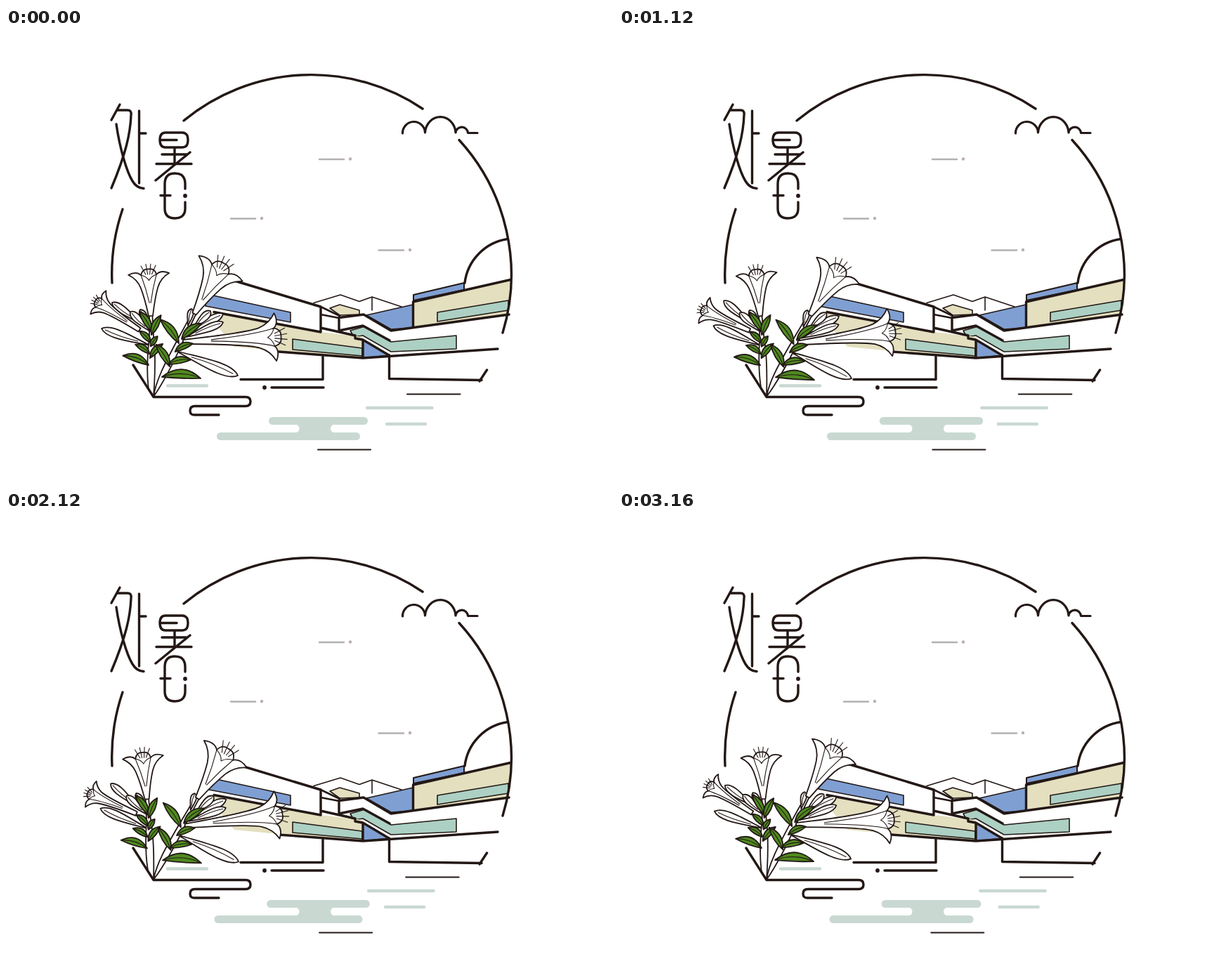
An HTML page that plays this animation: 864x648 px, repeating every 3200 ms.

```html
<!DOCTYPE html>
<html lang="zh">
<head>
<meta charset="utf-8">
<title>处暑</title>
<style>
  html, body { margin: 0; width: 100%; height: 100%; overflow: hidden; background: #fff; }
  svg { display: block; width: 864px; height: 648px; --sway: 0; --wave: 0; }
  path { fill: none; stroke: #231815; stroke-linecap: round; stroke-linejoin: round; }
  .ink path, path.ink { stroke-width: 3.4; }
  .mid { stroke-width: 2.6; }
  .thin { stroke-width: 1.6; }
  .fine { stroke-width: 2; }
  .grey { stroke: #b3b1b1; stroke-width: 2.4; }
  .pool { stroke: #c9d9d2; stroke-width: 4.4; }
  .dot { fill: #bdaeb0; }
  .blue { fill: #7f9fd3; }
  .sand { fill: #e3dfbf; }
  .teal { fill: #acd0c3; }
  .white { fill: #fff; }
  .bare { stroke: none; }

  .plant path { fill: #fff; stroke-width: 1.8; }
  .plant .crease { fill: none; stroke-width: 1.1; }
  .plant .leaf { fill: #4f8a1f; }
  .plant { transform-origin: 210px 525px; }
  #stemL { transform: rotate(calc(-4.1deg * var(--sway))); }
  #stemR { transform: rotate(calc(3.3deg * var(--sway))); }

  .bar { fill: #c9d9d2; height: 11px; rx: 5.5px; }
  #upper { x: calc(374px - 4px * var(--wave)); width: calc(141px + 8px * var(--wave)); }
  #lower { x: calc(300px - 5px * var(--wave)); width: calc(204px + 10px * var(--wave)); }
  #east { transform: translateX(calc(3px * var(--wave))); }
  #west { transform: translateX(calc(-2.7px * var(--wave))); }
</style>
</head>
<body>
<svg id="scene" viewBox="0 0 864 648">
  <!-- cloud and sun -->
  <path class="mid" style="stroke-width:3.2" d="M564.5 150A16 16 0 0 1 596.5 149A21.8 24 0 0 1 640 149A8.8 9 0 0 1 657.500 149.500H671"/>
  <path class="ink" d="M653 363A72 72 0 0 1 714 300.500"/>

  <!-- drawn title -->
  <g class="ink">
    <path d="M162 109L150 131M158 117H173Q179 117 178 124C177 150 171 178 150 228M157 137C162 172 172 205 180 218Q186 228 196 228.500M189.500 118V221M190 150H199"/>
    <path d="M227 149H251Q259 149 259 159.500T251 170H227Q219 170 219 159.500T227 149M220 159.500H243M240 170V193M222 180H257M214 193.500H264M262 177L213 217"/>
    <path d="M255 229V222Q255 207 240.500 207T226 222V257Q226 271 240.500 271T255 257V248M220 238.500H234"/>
    <circle cx="255" cy="239" r="2.900" fill="#231815"/>
  </g>

  <path class="grey" d="M446 187H481M320 271.500H355M530.500 316.500H566"/>
  <g class="dot">
    <circle cx="490" cy="186.500" r="2.200"/><circle cx="364" cy="271" r="2.200"/><circle cx="575" cy="316" r="2.200"/>
  </g>

  <!-- roofs behind -->
  <path class="thin" d="M438 391.500L476 380L503 389.500L521 383L563 397M521 383V402"/>
  <path class="thin sand" d="M461 399L475 394L503 402V408L475 409Z"/>
  <path class="mid" d="M448 397L475 410M448 408L474 413"/>

  <!-- right wing -->
  <path class="thin blue" d="M513 409L579 394V427L548 429Z"/>
  <path class="fine blue" d="M580 380L652 363V373L580 388Z"/>
  <path class="bare sand" d="M580 390L718 359L715 408L580 428Z"/>
  <path class="thin teal" d="M614 405L715 388V402L614 418Z"/>
  <path class="ink" d="M718 358.500L579.500 390V428"/>

  <!-- stair -->
  <path class="bare white" d="M474 432V412L509 408L548 431L716 410L700 457L545 466L508 442Z"/>
  <path class="thin teal" d="M490 431L511 425L548 447L641 438V457L548 461L508 438L495 440Z"/>
  <path class="ink" d="M474 431V412.500L509 408L548 431L716 408M474 431L508 424L546 445"/>
  <path class="thin blue" d="M508 444V470L546 466Z"/>

  <!-- left wing -->
  <path class="bare sand" d="M284 404L448 433L508 440V470L388 460L325 454Z"/>
  <path class="thin teal" d="M408 443L507 456V467L408 458Z"/>
  <path class="bare white" d="M280 375L334 362L448 397V433L295 404Z"/>
  <path class="thin blue" d="M286 379L405 405V419L284 396Z"/>
  <path class="ink" d="M322 359L448 397V433L296 404.500M448 427L497 438V442L508 444V470M388 461L508 470L700 457M508 444L545 466"/>

  <!-- ring, piers and quay -->
  <path class="ink" d="M253 132A284.500 284.500 0 0 1 593 115M645 159.500A284.500 284.500 0 0 1 707 434M166 258A284.500 284.500 0 0 0 151 363"/>
  <path class="ink" d="M334 500.500H451V468M545.500 466V499.500L677 501.500M674 503L684.500 487M378 512H452"/>
  <circle cx="368" cy="512" r="2.900" fill="#231815"/>
  <path class="pool" d="M230 509.500H286"/>

  <!-- water -->
  <path class="bare" style="fill:#c9d9d2" d="M411.500 564.500a5.800 5.800 0 0 1 0 12H468a5.800 5.800 0 0 1 0-12Z"/>
  <rect id="upper" class="bar" y="554"/>
  <rect id="lower" class="bar" y="576"/>
  <g id="east"><path class="pool" d="M514 541H606.500"/><path class="fine" d="M444 600.500H519"/></g>
  <g id="west"><path class="pool" d="M542 564H597"/><path class="fine" d="M571 521.500H646.500"/></g>

  <g id="stemL" class="plant"></g>
  <g id="stemR" class="plant"></g>
  <path class="ink" d="M181 480L210 525.500H341Q348 525.500 348 532T341 538.500H269Q262 538.500 262 545T269 551H303"/>
</svg>
<script>
const $ = id => document.getElementById(id);
const mix = (a, b, t) => a + (b - a) * t;
const path = (d, kind = '') => `<path class="${kind}" d="${d}"/>`;

// Puts a part drawn along +x at its base; it turns about that base as it sways
const place = (x, y, heading, swing, body) =>
  `<g style="transform:translate(${x}px,${y}px) rotate(calc(${heading}deg + ${swing}deg * var(--sway)))">${body}</g>`;

const between = ([x, y], [u, v], swing, draw) =>
  place(x, y, Math.atan2(v - y, u - x) * 180 / Math.PI, swing, draw(Math.hypot(u - x, v - y)));

// Trumpet flower: a tube flaring into two curled petals around a centre pair
const lily = (base, tip, h, swing = 0) => between(base, tip, swing, len => {
  const at = (a, b) => `${len + a * h} ${b * h}`;
  const edge = s => `Q${at(-1.3, .24 * s)} ${at(-.75, .42 * s)}Q${at(-.3, .58 * s)} ${at(-.08, s)}`;
  const half = s => `M0 ${3 * s}${edge(s)}Q${at(.1, .6 * s)} ${at(-.12, .38 * s)}Q${at(.2, .3 * s)} ${at(.16, 0)}L0 0`;
  let lines = '';
  for (const s of [-1, 1])
    lines += `M${at(-.12, .38 * s)}Q${at(-.8, .16 * s)} ${len * .3} ${s}M${at(-.12, .38 * s)}Q${at(-.2, .1 * s)} ${at(-.4, 0)}`;
  for (let k = -1.5; k <= 1.5; k++) lines += `M${at(-.1, .1 * k)}L${at(.42 - .04 * k * k, .24 * k)}`;
  return path(half(-1) + half(1), 'bare') + path(
    `M0 -3${edge(-1)}Q${at(.1, -.6)} ${at(-.12, -.38)}Q${at(.2, -.3)} ${at(.16, 0)}` +
    `Q${at(.2, .3)} ${at(-.12, .38)}Q${at(.1, .6)} ${at(-.08, 1)}` +
    `Q${at(-.3, .58)} ${at(-.75, .42)}Q${at(-1.3, .24)} 0 3Z`) + path(lines, 'crease');
});

const bud = (base, tip, w, swing = 0) => between(base, tip, swing, len => {
  const side = s => `${len * .4} ${s * w * .4}`, nose = s => `${len * .85} ${s * w * 1.3}`;
  return path(`M0 0C${side(-1)} ${nose(-1)} ${len} 0C${nose(1)} ${side(1)} 0 0Z`) +
    path(`M${len * .25} 0Q${len * .6} ${-w * .3} ${len * .92} 0`, 'crease');
});

// Leaves up one side of a stem; lean is measured from upright, middle ones are shorter
function leaves(n, [x, y], [u, v], lean, size) {
  let out = '';
  for (let i = 0; i < n; i++) {
    const t = i / (n - 1), a = mix(...lean, t);
    const len = mix(...size, t) * (1 - .4 * Math.sin(Math.PI * t));
    const bend = -Math.sin(a * Math.PI / 180) * len * .2, w = 5 + len * .14;
    out += place(mix(x, u, t), mix(y, v, t), a - 90, 0,
      path(`M0 0Q${len / 2} ${bend - w} ${len} 0Q${len / 2} ${bend + w} 0 0Z`, 'leaf') +
      path(`M0 0Q${len / 2} ${bend} ${len} 0`, 'crease'));
  }
  return out;
}

$('stemL').innerHTML =
  bud([193, 421], [151, 391], 8, 12) +
  bud([205, 452], [136, 428], 9, 10) +
  lily([190, 430], [130, 390], 20, -12) +
  path('M203 514Q199 486 204 440V402H208L210 440Q214 470 210 525Z') +
  bud([205, 432], [177, 404], 8) +
  bud([207, 430], [191, 401], 7) +
  lily([206, 410], [203, 348], 29) +
  leaves(4, [203, 480], [207, 432], [-70, -31], [39, 33]) +
  leaves(3, [205, 470], [207, 437], [42, 26], [27, 31]);

$('stemR').innerHTML =
  bud([242, 460], [330, 495], 11) +
  path('M210 525C213 503 226 478 243 446L266 404H272L252 446C238 478 226 502 210 525Z') +
  bud([254, 437], [309, 407], 9) +
  bud([257, 440], [309, 419], 8) +
  bud([259, 424], [264, 400], 6) +
  bud([266, 428], [291, 403], 8) +
  lily([252, 447], [386, 440], 34, -9.3) +
  lily([268, 407], [307, 340], 36) +
  leaves(2, [233, 482], [246, 449], [-32, -38], [37, 43]) +
  leaves(4, [222, 497], [250, 443], [92, 52], [55, 36]);

const triangle = (t, period) => 1 - Math.abs(1 - 2 * (t % period) / period);
const start = performance.now();

function tick() {
  const t = Math.floor((performance.now() - start) % 3200 / 40) * 40;
  $('scene').style.setProperty('--sway', triangle(t, 1600));
  $('scene').style.setProperty('--wave', triangle(t, 800));
  requestAnimationFrame(tick);
}
tick();
</script>
</body>
</html>
```
